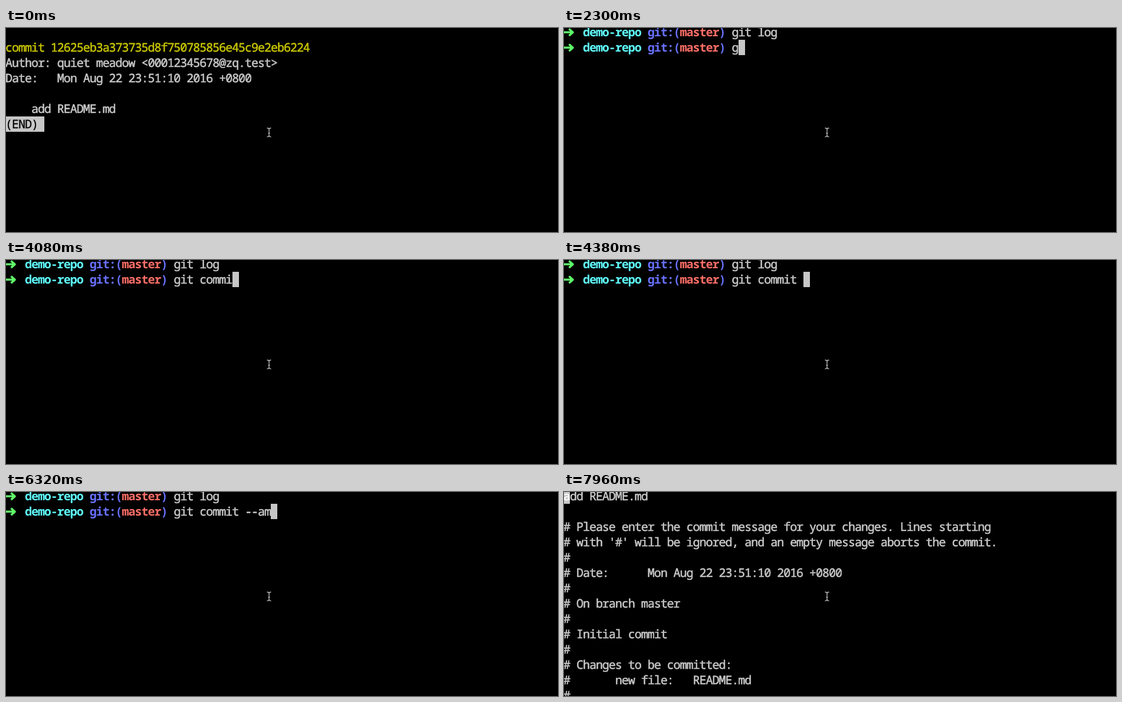
An HTML page for the animation above (8000 ms loop, 936x346 px).

```html
<!DOCTYPE html>
<html lang="en">
<head>
<meta charset="utf-8">
<title>Terminal session</title>
<style>
  html, body { margin: 0; width: 100%; height: 100%; overflow: hidden; background: #000; }
  #stage {
    --cell: 10.975px;
    position: relative; width: 936px; height: 346px; overflow: hidden;
    background: #000; color: #c7c7c7;
    font: 500 20px/26px "Noto Sans Mono", "DejaVu Sans Mono", monospace;
    font-variant-ligatures: none; text-rendering: geometricPrecision;
  }
  pre {
    position: absolute; left: -1px; top: -6px; margin: 0; font: inherit;
    letter-spacing: calc(var(--cell) - 1ch);
    -webkit-text-stroke: .6px currentColor;
  }
  .screen { position: absolute; inset: 0; visibility: hidden; }
  .screen.on { visibility: visible; }
  .block { position: absolute; left: 0; width: 11px; height: 26px; background: #c7c7c7; }
  svg { position: absolute; left: 0; top: 0; fill: none; }
  b { font-weight: 700; -webkit-text-stroke-width: 0; }
  .yellow { color: #c7c400; }
  .cyan { color: #60fdff; }
  .blue { color: #6871ff; }
  .red { color: #ff6e67; }
  .dark { color: #000; -webkit-text-stroke: .3px #000; }
  .light { color: #fff; }
</style>
</head>
<body>
<div id="stage">
  <div class="screen on" id="log">
    <div class="block" style="top:150px;width:65px"></div>
    <pre>
&#8203;
<span class="yellow">commit 12625eb3a373735d8f750785856e45c9e2eb6224</span>
Author: quiet meadow &lt;00012345678@zq.test&gt;
Date:   Mon Aug 22 23:51:10 2016 +0800

    add README.md
<span class="dark">(END)</span></pre>
  </div>

  <div class="screen" id="shell">
    <div class="block" id="caret" style="top:20px"></div>
    <pre>   <b class="cyan">demo-repo</b> <b class="blue">git:(</b><b class="red">master</b><b class="blue">)</b> git log
   <b class="cyan">demo-repo</b> <b class="blue">git:(</b><b class="red">master</b><b class="blue">)</b> <span id="typed"></span></pre>
    <svg width="30" height="60" stroke="#5ffa68" stroke-width="3.6" stroke-linejoin="round">
      <path id="arrow" d="M0 33.3H13M8.5 27.5L15 33.3L8.5 39.2"/>
      <use href="#arrow" y="-26"/>
    </svg>
  </div>

  <div class="screen" id="editor">
    <div class="block" style="top:-6px;width:10px"></div>
    <pre><span class="light">a</span>dd README.md

# Please enter the commit message for your changes. Lines starting
# with '#' will be ignored, and an empty message aborts the commit.
#
# Date:      Mon Aug 22 23:51:10 2016 +0800
#
# On branch master
#
# Initial commit
#
# Changes to be committed:
#       new file:   README.md
#</pre>
  </div>

  <svg width="936" height="346" stroke="#d0d0d0" stroke-width="1.2">
    <path d="M442.5 169.6q3.5 0 3.5 2.6V182q0 2.6-3.5 2.6M449.5 169.6q-3.5 0-3.5 2.6M449.5 184.6q-3.5 0-3.5-2.6M444.5 178.5h3"/>
  </svg>
</div>
<script>
  const LOOP = 8000, CELL = 10.975, PROMPT = 26;
  const COMMAND = "git commit --amend";
  const KEYS = [2300, 2450, 2590, 2590, 3490, 3640, 3790, 3940, 4080, 4230,
                4380, 5420, 5570, 5870, 6320, 6470, 6620, 6760];
  const $ = id => document.getElementById(id);
  const screens = ["log", "shell", "editor"].map($);
  const typed = $("typed"), caret = $("caret");
  let shownScreen = -1, shownCount = -1;

  function draw() {
    const t = performance.now() % LOOP;
    const screen = t < 500 ? 0 : t < 7960 ? 1 : 2;
    const count = KEYS.filter(k => k <= t).length;
    if (screen !== shownScreen) {
      screens.forEach((el, i) => el.classList.toggle("on", i === screen));
      shownScreen = screen;
    }
    if (count !== shownCount) {
      typed.textContent = COMMAND.slice(0, count);
      caret.style.left = Math.floor((PROMPT + count) * CELL) + "px";
      shownCount = count;
    }
    requestAnimationFrame(draw);
  }
  draw();
</script>
</body>
</html>
```
